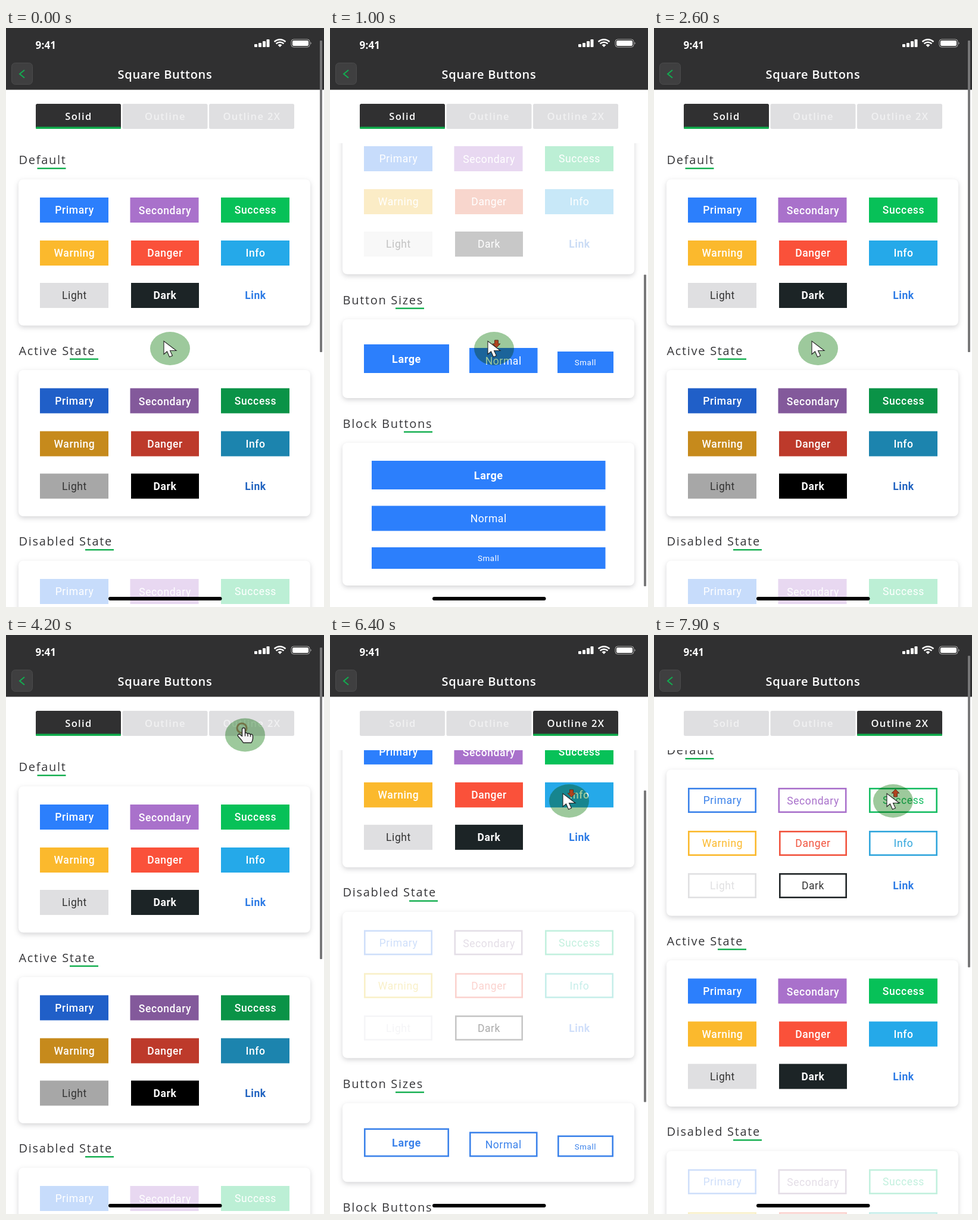
An HTML page that plays this animation: 534x970 px, repeating every 8 s.

```html
<!DOCTYPE html>
<html lang="en">
<head>
<meta charset="utf-8">
<title>Square Buttons</title>
<style>
  html, body { margin: 0; width: 100%; height: 100%; overflow: hidden; background: #fff; }
  svg { display: block; width: 534px; height: 970px; }
  text { font-family: Roboto, Arial, sans-serif; letter-spacing: .6px; text-anchor: middle; }
  .head, .title, .tab, .clock { font-family: "Open Sans", "Noto Sans", sans-serif; }
  .head { font-size: 20px; letter-spacing: 1.7px; text-anchor: start; fill: #353538; }
  .title { font-size: 20px; font-weight: 600; letter-spacing: .7px; fill: #fff; }
  .tab { font-size: 16.5px; font-weight: 600; letter-spacing: 1.4px; }
  .clock { font-size: 17px; font-weight: 700; letter-spacing: .2px; text-anchor: start; fill: #fff; }
  .card { fill: #fff; filter: drop-shadow(0 3px 4px rgba(40, 40, 50, .2)); }
  .halo { fill: #9dc99c; mix-blend-mode: multiply; }
</style>
</head>
<body>
<svg id="stage" viewBox="0 0 534 970">
  <defs><clipPath id="view"><rect y="193" width="534" height="777"/></clipPath>
    <clipPath id="top"><rect y="104" width="534" height="866"/></clipPath></defs>
  <rect width="534" height="970" fill="#fff"/>
  <g clip-path="url(#view)"><g id="page"></g></g>
  <rect width="534" height="103.5" fill="#303031"/>
  <text class="clock" x="49.5" y="35">9:41</text>
  <g fill="#fff">
    <rect x="417" y="27" width="5" height="5" rx="1"/>
    <rect x="424" y="25" width="5" height="7" rx="1"/>
    <rect x="431" y="22" width="5" height="10" rx="1"/>
    <rect x="437.500" y="19" width="5" height="13" rx="1"/>
    <path d="M456.500 28.500q3.500-3 7 0l-3.500 3.500z"/>
    <rect x="481" y="21" width="27" height="9" rx="2"/>
    <path d="M511.500 23.500q2.500 2 0 4z" opacity=".6"/>
  </g>
  <g fill="none" stroke="#fff">
    <path d="M450.500 23q9.500-7.500 19 0M453.500 26.300q6.500-5 13 0" stroke-width="2.400"/>
    <rect x="479" y="19" width="31" height="13" rx="4" opacity=".6"/>
  </g>
  <rect x="9.500" y="58.500" width="35" height="36" rx="6" fill="#3f3f40" stroke="#4a4a4b"/>
  <path d="M31 70.500L23 77L31 83.500" fill="none" stroke="#12ad50" stroke-width="2"/>
  <text class="title" x="267" y="85">Square Buttons</text>
  <g id="tabs"></g>
  <rect id="thumb" x="527" width="4" height="522" rx="1" fill="#777778"/>
  <rect x="172" y="953" width="190.500" height="6" rx="3" fill="#000"/>
  <g id="pointer">
    <ellipse class="halo" rx="33.500" ry="28"/>
    <path id="wheel" d="M-3-6H3V0H6.500L0 6.500L-6.500 0H-3Z" fill="#b0431f" stroke="#57301c"/>
    <circle id="ring" cx="-5.500" cy="-11.500" fill="none" stroke="#6d6436" stroke-width="3" opacity=".8"/>
    <path id="arrow" d="M-10.500-12.500V9.500L-5 5L-1 14L4 12L0 3.500H10.500Z" fill="#fff" stroke="#222" stroke-width="1.100"/>
    <g id="hand" stroke="#222" stroke-width="1.400" stroke-linejoin="round">
      <path fill="#f6f6f6" d="M-5-9Q-5-12-2.500-12T0-9V-3Q2-5 4-2Q6.500-4 8.500-1Q13-2 13 2V6Q13 9 10.500 13H-3Q-6 8-12 2Q-13-1.500-9.500-1.500L-5 2Z"/>
      <path fill="none" d="M0-3V2M4.500-2V2.500M9-1V3"/>
    </g>
  </g>
</svg>
<script>
const $ = id => document.getElementById(id);
const LOOP = 8000, STEP = 100;
const BLUE = '#2c7ffc', INK = '#303031', GREEN = '#10ad4d';

const rect = (x, y, w, h, fill, extra = '') =>
  `<rect x="${x}" y="${y}" width="${w}" height="${h}" fill="${fill}" ${extra}/>`;
const label = (s, x, y, fill, size = 17.5, weight = 400) =>
  `<text x="${x}" y="${y + size * .355}" fill="${fill}" font-size="${size}" font-weight="${weight}">${s}</text>`;
const frame = (x, y, w, h, color) =>
  rect(x + 1.3, y + 1.3, w - 2.6, h - 2.6, 'none', `stroke="${color}" stroke-width="2.6"`);

function section(name, y, lineX, cardH) {
  return `<text class="head" x="21.500" y="${y + 7}">${name}</text>` +
    rect(lineX, y + 13, 48, 2.4, GREEN) +
    rect(21, y + 32.5, 490, cardH, '#fff', 'class="card" rx="8"');
}

const NAMES = ['Primary', 'Secondary', 'Success', 'Warning', 'Danger', 'Info', 'Light', 'Dark', 'Link'];
const PALETTE = {
  normal: '#2c7ffc #a971cb #07c158 #fbb92d #fa513a #25a9e9 #dfdfe1 #1c2426 #2d7be5',
  active: '#205fc8 #83599b #0a9347 #c68a1c #bd3a2b #1c84ae #a7a7a7 #000000 #2163c0',
  faded: '#c7dcfb #e8d8f1 #bcefd5 #fbecc6 #f8d6cd #c8e8f8 #f8f8f8 #c8c8c8 #cbdcf5',
  line: '#3b82ea #a971cb #17bd63 #fbb92d #f1533d #31a6dc #e0e0e2 #1f2426 #2d7be5',
  fadedLine: '#cfdffa #e4dee7 #c2f0de #f9f0c8 #fbd2ce #c6eeea #f5f5f7 #c6c6c6 #d0dffa'
};

function grid(key, y) {
  const outlined = /line/i.test(key), faded = /faded/.test(key);
  return PALETTE[key].split(' ').map((color, i) => {
    const col = i % 3, row = (i - col) / 3, name = NAMES[i];
    const x = [57, row ? 210 : 208.5, 361][col], w = col === 1 && row ? 114 : 115;
    const top = y + [0, 72, 143][row], cx = [115, 267, 419][col];
    const cy = top + 21 + (i === 1 ? 1 : 0);
    if (name === 'Link') return label(name, cx, cy, color, 17.5, 600);
    if (outlined) {
      const ink = name === 'Dark' ? (faded ? '#aaaaaa' : '#333') : color;
      return frame(x, top, w, 42, color) + label(name, cx, cy, ink);
    }
    const ink = name === 'Light' ? (faded ? '#c2c2c2' : '#333') : '#fff';
    const weight = name === 'Light' || faded ? 400 : name === 'Dark' ? 600 : 500;
    return rect(x, top, w, 42, color) + label(name, cx, cy, ink, 17.5, weight);
  }).join('');
}

function sized(kind, x, y, w, h, outlined) {
  const [size, weight] = { Large: [18, 700], Normal: [17.5, 400], Small: [13.3, 400] }[kind];
  const box = outlined ? frame(x, y, w, h, '#3b82ea') : rect(x, y, w, h, BLUE);
  return box + label(kind, x + w / 2, y + h / 2 + .7, outlined ? '#3b82ea' : '#fff', size, weight);
}

function sheet(id, states, outlined) {
  return `<g id="${id}">` +
    section('Default', 221, 52.5, 245) + grid(states[0], 284) +
    section('Active State', 540.5, 107, 245) + grid(states[1], 603.5) +
    section('Disabled State', 860, 133, 245) + grid(states[2], 923) +
    section('Button Sizes', 1180.5, 110, 132) +
    sized('Large', 57, 1255, 143, 48, outlined) +
    sized('Normal', 234, 1261, 114.5, 42, outlined) +
    sized('Small', 382, 1267, 94, 36, outlined) +
    section('Block Buttons', 1387.5, 124, 239) +
    sized('Large', 70, 1450, 392.5, 48, outlined) +
    sized('Normal', 70, 1525.5, 392.5, 42, outlined) +
    sized('Small', 70, 1595, 392.5, 36, outlined) + '</g>';
}

$('page').innerHTML = sheet('solid', ['normal', 'active', 'faded'], false) +
  sheet('outline', ['line', 'normal', 'fadedLine'], true);

function drawTabs(current) {
  $('tabs').innerHTML = ['Solid', 'Outline', 'Outline 2X'].map((name, i) => {
    const x = 50 + i * 145.5, on = i === current;
    return rect(x, 127, 143, 42, on ? INK : '#dfdfe1', 'rx="2.500"') +
      (on ? rect(x, 165.5, 143, 3.5, GREEN, 'rx="1.500"') : '') +
      `<text class="tab" x="${x + 72}" y="154" fill="${on ? '#fff' : '#f1f1f2'}">${name}</text>`;
  }).join('');
}

// Linear interpolation through [time, value] points.
function track(points, t) {
  const i = points.findIndex(p => p[0] > t);
  if (i === 0) return points[0][1];
  if (i < 0) return points[points.length - 1][1];
  const [t0, a] = points[i - 1], [t1, b] = points[i];
  return a + (b - a) * (t - t0) / (t1 - t0);
}
const ease = (t, from, to) => {
  const k = Math.min(1, Math.max(0, (t - from) / (to - from)));
  return k * k * (3 - 2 * k);
};
const show = (id, on) => $(id).setAttribute('visibility', on ? 'visible' : 'hidden');

const SCROLL = [[150, 0], [1000, 725], [1100, 745], [1200, 755], [1500, 755], [1900, 381], [2320, 0],
  [5900, 0], [5920, 37], [6800, 755], [7150, 755], [7300, 663], [7900, 28], [8000, 15]];
const WHEEL_DOWN = [[200, -19], [1000, -8], [5600, -19], [5900, -19], [6800, -8]];

let tab = -1;
function draw(t) {
  const next = t < 4600 ? 0 : 2;
  if (next !== tab) {
    drawTabs(tab = next);
    show('solid', tab === 0);
    show('outline', tab === 2);
  }
  $('page').setAttribute('transform', `translate(0 ${-track(SCROLL, t)})`);
  // The thumb runs slightly ahead of the page.
  $('thumb').setAttribute('y', 21 + .538 * track(SCROLL, t + 20));

  const across = ease(t, 2800, 3600), back = ease(t, 4700, 5400);
  const x = 275.5 + 126 * across, y = 537 - 369.5 * across + 110.5 * back;
  $('pointer').setAttribute('transform', `translate(${x} ${y})`);
  const overTab = x > 351 && y < 181;
  show('hand', overTab);
  show('arrow', !overTab);

  const down = t >= 200 && t < 1400 || t >= 5600 && t < 7000;
  const up = t >= 1400 && t < 2600 || t >= 7000;
  show('wheel', down || up);
  const wheelY = down ? track(WHEEL_DOWN, t) : t < 5000 ? -18 : -13;
  $('wheel').setAttribute('transform', `translate(4 ${wheelY}) scale(1 ${up ? -1 : 1})`);

  show('ring', t >= 4100 && t < 4500);
  $('ring').setAttribute('r', Math.max(1, 8 + (t - 4200) / 40));
}

const start = performance.now();
function tick() {
  const t = (performance.now() - start) % LOOP;
  draw(Math.floor(t / STEP) * STEP);
  requestAnimationFrame(tick);
}
draw(0);
requestAnimationFrame(tick);
</script>
</body>
</html>
```
